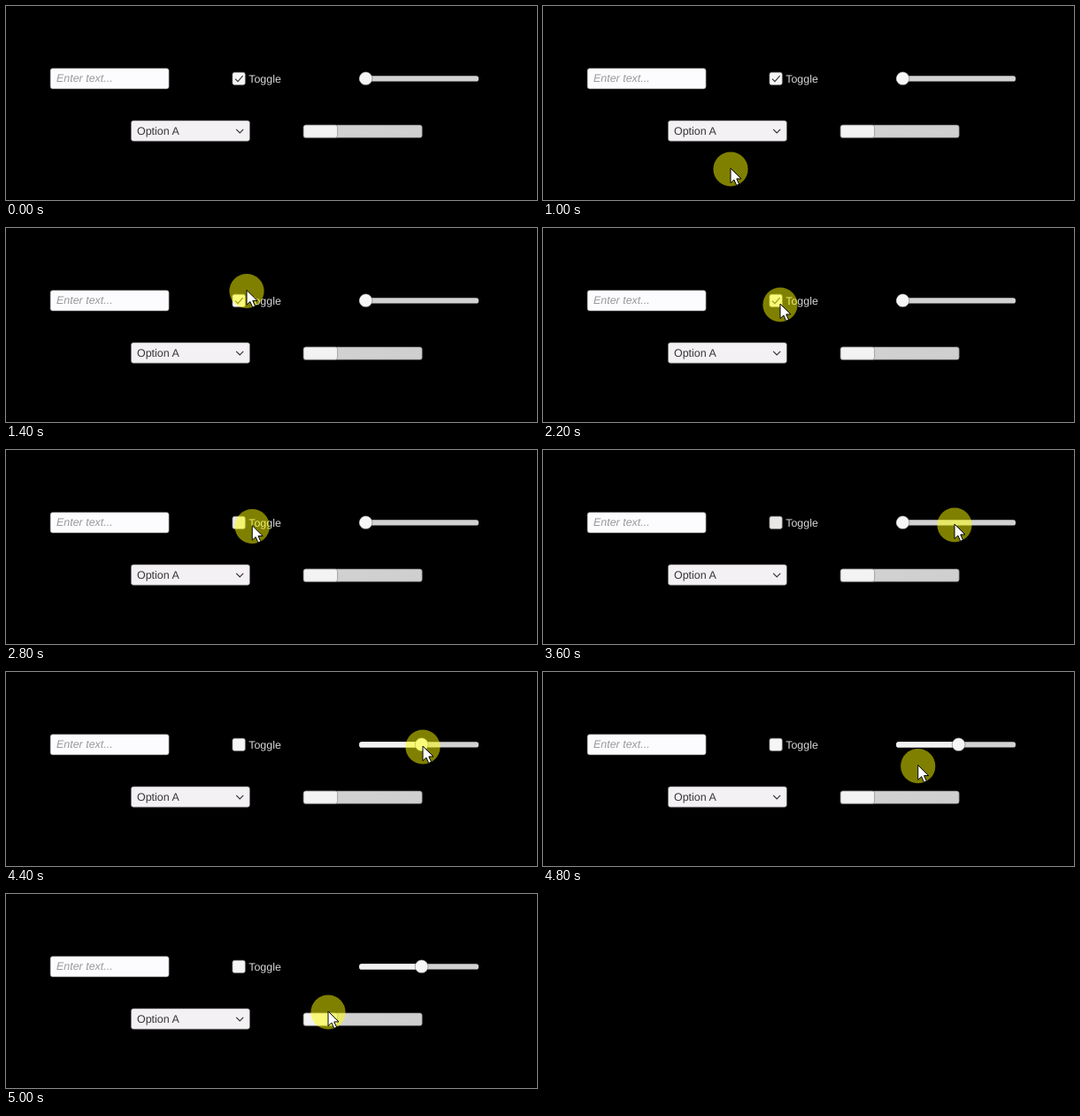
An HTML page that plays this animation: 600 px wide and 220 px high, repeating every 5.1 s.

```html
<!DOCTYPE html>
<html lang="en">
<head>
<meta charset="utf-8">
<title>UI controls</title>
<style>
  html, body { margin: 0; width: 100%; height: 100%; overflow: hidden; background: #000; }
  svg { display: block; width: 600px; height: 220px; }
  text { font-family: "Liberation Sans", Arial, sans-serif; font-size: 12.45px; text-rendering: geometricPrecision; }
  .panel { stroke: #777; stroke-width: .6; }
</style>
</head>
<body>
<svg viewBox="0 0 600 220" xmlns="http://www.w3.org/2000/svg">
  <defs>
    <linearGradient id="bar">
      <stop offset="0" stop-color="#d2d2d2"/>
      <stop offset="1" stop-color="#cfcfcf"/>
    </linearGradient>
  </defs>
  <rect width="600" height="220"/>

  <!-- input field -->
  <rect class="panel" x="50.1" y="70.7" width="134" height="23.2" rx="2.6" fill="#fcfbfd"/>
  <text x="57" y="86.4" fill="#9a989c" font-style="italic">Enter text...</text>

  <!-- toggle -->
  <rect id="box" class="panel" x="255.9" y="75.2" width="14.4" height="14.4" rx="2.4"/>
  <path id="check" d="M259 82.6l3 3.1 5.6-6.6" fill="none" stroke="#3a3a3a" stroke-width="1.2"/>
  <text x="274.2" y="86.5" fill="#d6d6d6">Toggle</text>

  <!-- slider -->
  <rect x="399.2" y="79.3" width="134.8" height="6.2" rx="2.6" fill="#d2d2d2"/>
  <rect id="fill" x="399.2" y="79.3" height="6.2" rx="2.6" fill="#f2f2f2"/>
  <circle id="knob" cy="82.2" r="7.4" fill="#f6f6f6" stroke="#555" stroke-width=".5"/>

  <!-- dropdown -->
  <rect class="panel" x="141.4" y="130" width="134" height="23.2" rx="2.6" fill="#f4f1f4"/>
  <text x="148" y="146.4" fill="#363438">Option A</text>
  <path d="M260.2 139.8l4 4 4-4" fill="none" stroke="#333" stroke-width="1.2"/>

  <!-- scrollbar -->
  <rect class="panel" x="336.2" y="135" width="134" height="14.3" rx="2.6" fill="url(#bar)"/>
  <rect class="panel" x="336.2" y="135" width="38.4" height="14.3" rx="2.6" fill="#f3f3f3"/>

  <g id="cursor">
    <circle r="19.6" fill="#ff0" fill-opacity=".5"/>
    <path d="M0 -1V15.6L3.9 12L6.7 18.4L9.6 17.1L6.8 10.9H12Z" fill="#fff" stroke="#000" stroke-width="1"/>
  </g>
</svg>
<script>
const LOOP = 5100, STEP = 100;
const SHOW = 1000, UNCHECK = 2600, SLIDE = 3900;
const $ = id => document.getElementById(id);
const start = performance.now();

const smooth = k => k * k * (3 - 2 * k);
const speedUp = k => k ** 1.6;

const home = { x: 212, y: 185 };
const moves = [
  { from: SHOW, to: 1300, x: 281, y: 76, ease: smooth },
  { from: 1300, to: 1400, x: 272, y: 71.5, ease: smooth },
  { from: 1500, to: 2000, x: 268, y: 87, ease: smooth },
  { from: UNCHECK, to: 3100, x: 297, y: 86, ease: smooth },
  { from: 3200, to: 3600, x: 465, y: 85, ease: smooth },
  { from: 3600, to: SLIDE, x: 471, y: 85, ease: smooth },
  { from: 4500, to: 5000, x: 364, y: 134, ease: speedUp }
];

function pointAt(t) {
  let { x, y } = home;
  for (const m of moves) {
    const k = m.ease(Math.min(1, Math.max(0, (t - m.from) / (m.to - m.from))));
    x += (m.x - x) * k;
    y += (m.y - y) * k;
  }
  return { x, y };
}

function draw(t) {
  const { x, y } = pointAt(t);
  const focused = t >= UNCHECK && t < SLIDE;
  const knob = t < SLIDE ? 406.5 : 469.6;
  $('cursor').setAttribute('transform', `translate(${x} ${y})`);
  $('cursor').style.display = t < SHOW ? 'none' : '';
  $('check').style.display = t < UNCHECK ? '' : 'none';
  $('box').setAttribute('fill', focused ? '#e8e7e6' : '#f5f5f5');
  $('knob').setAttribute('cx', knob);
  $('fill').setAttribute('width', knob - 399.2);
}

function tick() {
  const t = Math.max(0, performance.now() - start) % LOOP;
  draw(Math.floor(t / STEP) * STEP);
  requestAnimationFrame(tick);
}
tick();
</script>
</body>
</html>
```
